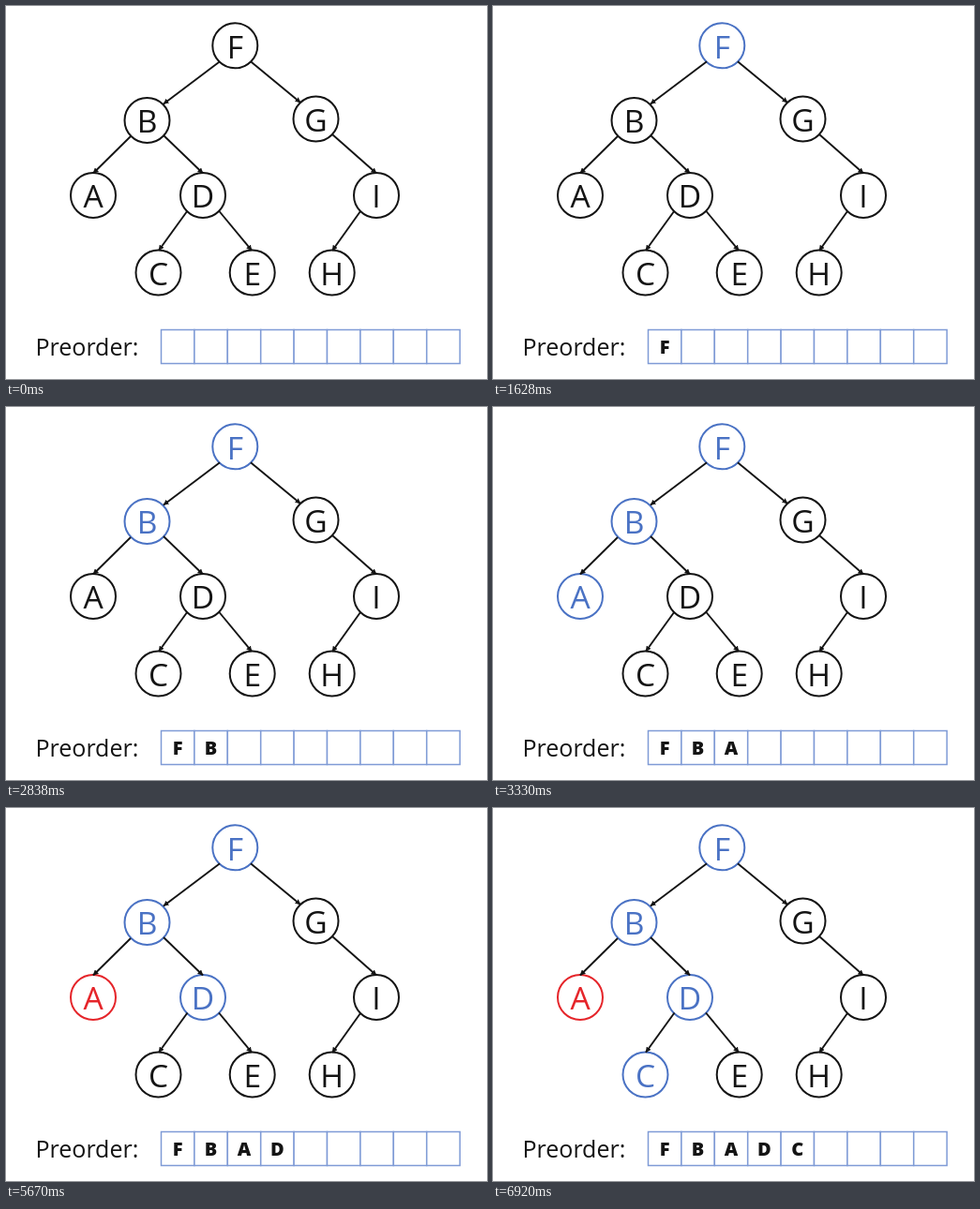
An HTML page for the animation above (8000 ms loop, 513 by 398 pixels).

```html
<!DOCTYPE html>
<html lang="en">
<head>
<meta charset="utf-8">
<title>Preorder traversal</title>
<style>
  html, body { margin: 0; width: 100%; height: 100%; overflow: hidden; background: #fff; }
  svg { display: block; width: 513px; height: 398px; font-family: "Open Sans", sans-serif; }
  .node { color: #141414; }
  .node.visited { color: #4a72c4; }
  .node.done { color: #e5252a; }
  .node circle { fill: #fff; stroke: currentColor; stroke-width: 2; }
  .node text { fill: currentColor; font-size: 33.5px; text-anchor: middle; }
  .edge { stroke: #141414; stroke-width: 1.9; }
  .cell { fill: #fff; stroke: #7f9bd6; stroke-width: 1.5; }
  .output { font-size: 20px; font-weight: 800; text-anchor: middle; fill: #141414; }
  .label { font-size: 25px; fill: #141414; }
</style>
</head>
<body>
<svg id="stage" viewBox="0 0 513 398">
  <defs>
    <marker id="arrow" viewBox="0 0 6 6" refX="5.5" refY="3" markerWidth="6" markerHeight="6"
            markerUnits="userSpaceOnUse" orient="auto">
      <path d="M0 0L6 3L0 6z" fill="#141414"/>
    </marker>
  </defs>
  <text class="label" x="31.5" y="373">Preorder:</text>
</svg>
<script>
const LOOP = 8000;
const CELL = { x: 165.5, y: 345.5, width: 35.4, height: 36, count: 9 };

const nodes = {
  F: [244.3, 42.3], B: [150.5, 122], G: [330.5, 120.5],
  A: [93, 202], D: [210, 202], I: [395, 202],
  C: [162.5, 284.5], E: [262.7, 284.5], H: [347.7, 284.5]
};

// Each edge: x1, y1, x2, y2
const edges = [
  [228, 59.3, 168, 104.5], [261, 59.3, 314, 103],
  [133, 139, 93, 178.5], [168, 138, 210, 178.5], [348, 137, 395, 178.5],
  [193.5, 218.5, 163, 260.7], [227, 218.5, 262, 260.7], [378, 219, 348, 261]
];

const steps = [
  { at: 920, node: 'F', state: 'visited' },
  { at: 2100, node: 'B', state: 'visited' },
  { at: 3330, node: 'A', state: 'visited' },
  { at: 4510, node: 'A', state: 'done' },
  { at: 5670, node: 'D', state: 'visited' },
  { at: 6920, node: 'C', state: 'visited' }
];

const stage = document.getElementById('stage');

function add(parent, tag, attributes, text = '') {
  const element = document.createElementNS('http://www.w3.org/2000/svg', tag);
  for (const [name, value] of Object.entries(attributes)) element.setAttribute(name, value);
  element.textContent = text;
  return parent.appendChild(element);
}

const groups = {};
for (const [name, [x, y]] of Object.entries(nodes)) {
  groups[name] = add(stage, 'g', { class: 'node' });
  add(groups[name], 'circle', { cx: x, cy: y, r: 24 });
  add(groups[name], 'text', { x, y: y + 13.3 }, name);
}

for (const [x1, y1, x2, y2] of edges) {
  add(stage, 'line', { class: 'edge', x1, y1, x2, y2, 'marker-end': 'url(#arrow)' });
}

const outputs = Array.from({ length: CELL.count }, (_, i) => {
  const { y, width, height } = CELL;
  const x = CELL.x + i * width;
  add(stage, 'rect', { class: 'cell', x, y, width, height });
  return add(stage, 'text', { class: 'output', x: x + width / 2, y: 371.3 });
});

function draw(time) {
  const past = steps.filter(step => step.at <= time);
  const order = past.filter(step => step.state === 'visited').map(step => step.node);
  const states = Object.fromEntries(past.map(step => [step.node, step.state]));
  for (const name in groups) groups[name].setAttribute('class', `node ${states[name] || ''}`);
  outputs.forEach((output, i) => { output.textContent = order[i] || ''; });
}

function tick() {
  draw(performance.now() % LOOP);
  requestAnimationFrame(tick);
}
tick();
</script>
</body>
</html>
```
